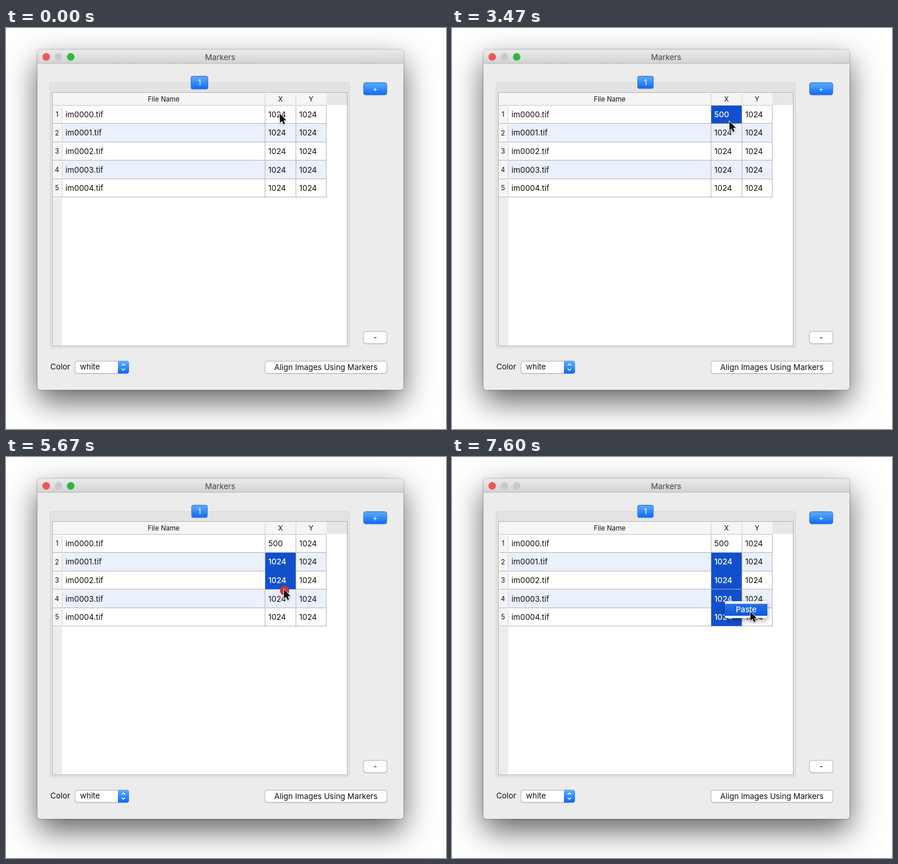
Write an HTML page with a canvas that moves like this. It is 755 by 687 pixels and loops after 8 s.

```html
<!DOCTYPE html>
<html>
<head>
<meta charset="utf-8">
<style>
  html, body { margin: 0; overflow: hidden; background: #fff; }
  canvas { display: block; }
</style>
</head>
<body>
<canvas id="stage" width="755" height="687"></canvas>
<script>
const ctx = document.getElementById('stage').getContext('2d');
const LOOP = 8000, ROW_TOP = 132, ROW_H = 31.6;
const EDIT = 1530, COMMIT = 2070, DRAG = 5400, RELEASE = 6320;

// Pointer: time, x, y
const path = [
  [0, 470, 147], [2930, 470, 147], [3200, 475, 174], [3400, 475, 174], [3470, 476, 160],
  [3670, 477, 150], [4130, 478, 150], [4530, 510, 163], [4800, 510, 163], [4930, 487, 180],
  [5070, 476, 178], [5470, 476, 180], [5530, 477, 187], [5670, 477, 227], [6130, 477, 274],
  [6330, 477, 276], [6530, 466, 254], [6670, 467, 247], [7070, 467, 247], [7600, 512, 265]
];
// Clicks: press, release, x, y
const clicks = [[3870, 3900, 478, 153], [4730, 4810, 510, 163], [DRAG, RELEASE, 477, 276], [6800, 6880, 467, 249]];
const menus = [
  { label: 'Copy', x: 478, y: 149, open: 3930, close: 4870 },
  { label: 'Paste', x: 468, y: 247, open: 6800, close: LOOP }
];

function pointer(t) {
  const i = path.findIndex(p => p[0] > t);
  if (i < 0) return path[path.length - 1].slice(1);
  const [t0, x0, y0] = path[i - 1], [t1, x1, y1] = path[i], k = (t - t0) / (t1 - t0);
  return [x0 + (x1 - x0) * k, y0 + (y1 - y0) * k];
}

function rect(x, y, w, h, fill) {
  ctx.fillStyle = fill;
  ctx.fillRect(x, y, w, h);
}

function roundRect(x, y, w, h, r, fill, stroke) {
  ctx.beginPath();
  ctx.roundRect(x, y, w, h, r);
  ctx.fillStyle = fill;
  ctx.fill();
  if (stroke) { ctx.strokeStyle = stroke; ctx.lineWidth = 1; ctx.stroke(); }
}

function circle(x, y, r, fill) {
  ctx.beginPath();
  ctx.arc(x, y, r, 0, 7);
  ctx.fillStyle = fill;
  ctx.fill();
}

function text(s, x, y, { size = 13.4, color = '#111', weight = 400, align = 'left' } = {}) {
  ctx.font = `${weight} ${size}px Inter, sans-serif`;
  ctx.textAlign = align;
  ctx.fillStyle = color;
  ctx.fillText(s, x, y);
}

function vertical(y, h, ...colors) {
  const g = ctx.createLinearGradient(0, y, 0, y + h);
  colors.forEach((c, i) => g.addColorStop(i / (colors.length - 1), c));
  return g;
}

function shadow(blur, dy, color) {
  ctx.shadowBlur = blur;
  ctx.shadowOffsetY = dy;
  ctx.shadowColor = color;
}
const noShadow = () => shadow(0, 0, 'transparent');

function button(x, y, w, h, label, blue, r = 4) {
  shadow(1, 0.5, 'rgba(0,0,0,.25)');
  roundRect(x + .5, y + .5, w - 1, h - 1, r, blue ? vertical(y, h, '#63affb', '#0b69f8') : '#fff',
    blue ? '#3b87ea' : '#c6c6c6');
  noShadow();
  text(label, x + w / 2, y + h / 2 + 4.8, { align: 'center', color: blue ? '#fff' : '#111' });
}

function drawWindow(t, menuOpen) {
  rect(0, 0, 755, 687, '#fff');
  shadow(52, 20, 'rgba(0,0,0,.62)');
  roundRect(54, 37.5, 628, 582.5, 5, '#ececec');
  shadow(3, 0, 'rgba(0,0,0,.4)');
  roundRect(54, 37.5, 628, 582.5, 5, '#ececec');
  noShadow();
  roundRect(54, 37.5, 628, 23.5, [5, 5, 0, 0], vertical(37, 24, '#ebebeb', '#d2d2d2'));
  rect(54, 60, 628, 1, '#b9b9b9');
  circle(69, 49.5, 6.5, '#ee5650');
  circle(90, 49.5, 6.5, '#c9c9c9');
  circle(111, 49.5, 6.5, menuOpen ? '#c9c9c9' : '#2db742');
  text('Markers', 367.5, 54.5, { align: 'center', color: '#444' });

  roundRect(75.5, 93.5, 514, 455, 3, '#e3e3e3', '#d6d6d6');
  const grow = t < 70 ? 1 : 0;
  button(318 - grow, 82, 28 + 2 * grow, 22 + grow, '1', true, 3);
  button(613, 93, 41, 22, '+', true);
  button(613, 519, 41, 22, '-');
  button(444, 570, 210, 22, 'Align Images Using Markers');
  text('Color', 76, 585);
  button(118, 570, 93, 22, '');
  roundRect(192, 570, 19, 22, [0, 4, 4, 0], vertical(570, 22, '#63affb', '#0b69f8'));
  text('white', 127, 584.5);
  ctx.strokeStyle = '#fff';
  ctx.lineWidth = 1.4;
  for (const d of [-1, 1]) {
    ctx.beginPath();
    ctx.moveTo(198.5, 581 + 2.5 * d);
    ctx.lineTo(201.5, 581 + 5.5 * d);
    ctx.lineTo(204.5, 581 + 2.5 * d);
    ctx.stroke();
  }
}

function drawTable(t) {
  rect(79, 110, 507, 435, '#b4b4b4');
  rect(80, 111, 505, 433, '#fff');
  rect(80, 111, 470, 21, '#f5f5f5');
  rect(550, 111, 35, 21, '#e7e7e7');
  rect(80, 132, 16.5, 158, '#f5f5f5');
  rect(80, 291, 16.5, 253, '#ececec');
  const small = { size: 11.6, align: 'center' };
  text('File Name', 270.5, 125.5, small);
  text('X', 471, 125.5, small);
  text('Y', 523.5, 125.5, small);
  for (const x of [444, 497]) rect(x, 113, 1, 18, '#d2d2d2');

  const last = Math.floor((pointer(Math.min(t, RELEASE))[1] - 133) / ROW_H);
  const isSelected = i => t >= DRAG ? i > 0 && i <= last : t >= COMMIT && i === 0;
  for (let i = 0; i < 5; i++) {
    const y = Math.round(ROW_TOP + i * ROW_H), base = 152.8 + i * ROW_H;
    if (i % 2) rect(97, y, 453, 32, '#ebf0fd');
    text(i + 1, 87.5, base - .8, { size: 11.3, align: 'center' });
    text(`im000${i}.tif`, 102, base);
    text('1024', 503, base);
    rect(96, y + 3, 1, 27, '#d4d4d4');
    rect(80, y + 31, 470, 1, '#b5b5b5');
    if (isSelected(i)) rect(445, y, 52, 31.5, '#1250cb');
    const value = i === 0 && t >= COMMIT ? '500' : '1024';
    text(value, 450, base, isSelected(i) ? { color: '#fff', weight: 500 } : {});
    if (isSelected(i) && isSelected(i + 1))
      for (let x = 445; x < 497; x += 2) rect(x, y + 31, 1, 1, '#c9d8f5');
  }
  rect(79, 132, 471, 1, '#c6c6c6');
  for (const x of [444, 497, 549]) rect(x, 132, 1, 159, '#b5b5b5');
}

function drawEditor(t) {
  rect(443, 132, 55, 33, '#6fa6e6');
  rect(446, 135, 50, 27, '#fff');
  const value = t < 1600 ? '1024' : t < 1670 ? '5' : t < 1800 ? '50' : '500';
  if (value === '1024') rect(446, 140, 32, 16, '#abcdf5');
  text(value, 446, 152.8);
  if (value !== '1024') return;
  ctx.lineWidth = 1.5;
  ctx.strokeStyle = '#222';
  ctx.beginPath();
  ctx.moveTo(469, 141);
  ctx.quadraticCurveTo(472, 141, 472, 144);
  ctx.lineTo(472, 153);
  ctx.quadraticCurveTo(472, 156, 469, 156);
  ctx.moveTo(475, 141);
  ctx.quadraticCurveTo(472, 141, 472, 144);
  ctx.moveTo(472, 153);
  ctx.quadraticCurveTo(472, 156, 475, 156);
  ctx.moveTo(470, 150);
  ctx.lineTo(474, 150);
  ctx.stroke();
}

function drawMenu({ label, x, y, open, close }, t, py) {
  const alpha = Math.min(1, 1 - (t - close) / 200);
  if (t < open || alpha <= 0) return;
  const hover = t >= close || py > y + 5;
  ctx.globalAlpha = alpha;
  shadow(9, 3, 'rgba(0,0,0,.4)');
  roundRect(x, y, 73, 29, 4, '#f7f7f7');
  noShadow();
  if (hover) rect(x, y + 4.5, 73, 20.5, vertical(y + 4, 21, '#2a70e6', '#0d5ad8'));
  text(label, x + 19, y + 19, { color: hover ? '#fff' : '#111', weight: 500 });
  ctx.globalAlpha = 1;
}

function drawClick([press, release, x, y], t, [px, py]) {
  if (t < press) return;
  const age = t - release;
  if (age < 0) return circle(px + 1, py + 2, 8, '#d2343a');
  if (age > 660) return;
  ctx.globalAlpha = Math.min(1, 1.6 * (1 - age / 660));
  ctx.lineWidth = 5.5;
  ctx.strokeStyle = '#b8292c';
  ctx.beginPath();
  ctx.arc(x, y, 8 + age * .1, 0, 7);
  ctx.stroke();
  ctx.globalAlpha = 1;
}

function drawArrow([x, y]) {
  ctx.save();
  ctx.translate(x, y);
  shadow(3, 1, 'rgba(0,0,0,.35)');
  ctx.beginPath();
  for (const [a, b] of [[0, 0], [0, 15.5], [3.6, 12.3], [6.2, 18], [8.8, 16.8], [6.4, 11.3], [11, 11]]) ctx.lineTo(a, b);
  ctx.closePath();
  ctx.lineWidth = 1.6;
  ctx.strokeStyle = '#fff';
  ctx.stroke();
  noShadow();
  ctx.fillStyle = '#111';
  ctx.fill();
  ctx.restore();
}

function frame(now) {
  const t = now % LOOP, pos = pointer(t);
  const editing = t >= EDIT && t < COMMIT;
  drawWindow(t, menus.some(m => t >= m.open && t < m.close));
  drawTable(t);
  if (editing) drawEditor(t);
  menus.forEach(m => drawMenu(m, t, pos[1]));
  clicks.forEach(c => drawClick(c, t, pos));
  if (!editing) drawArrow(pos);
  requestAnimationFrame(frame);
}
requestAnimationFrame(frame);
</script>
</body>
</html>
```
